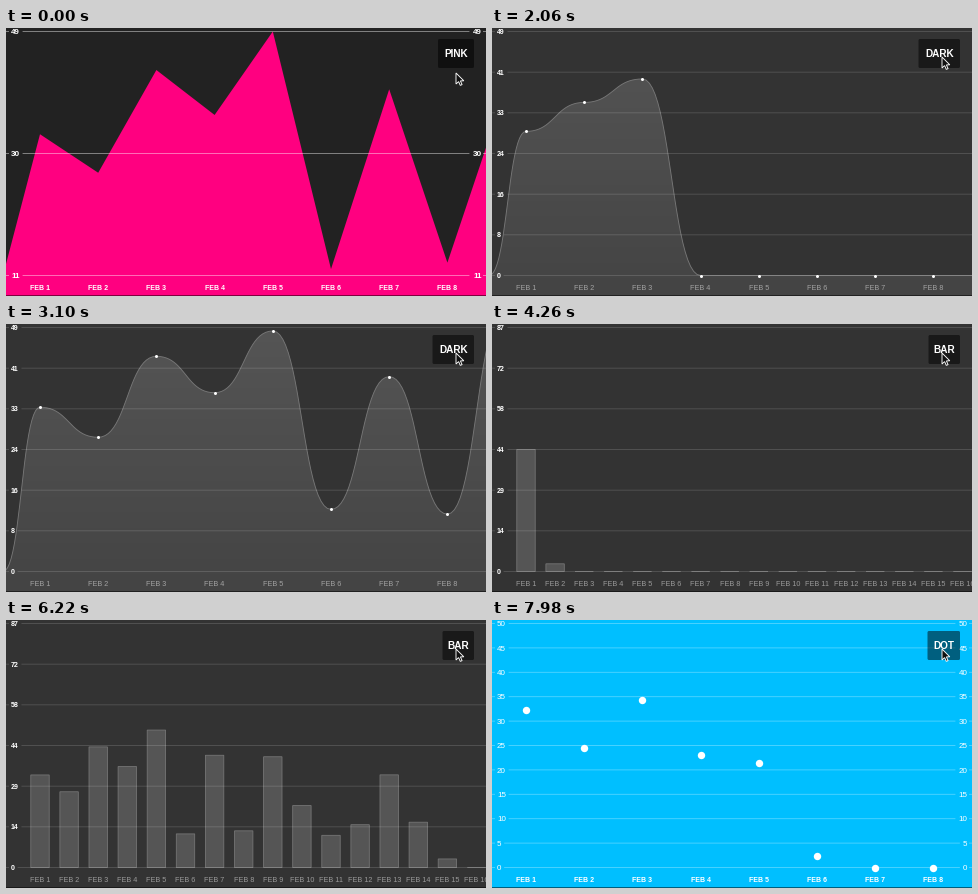
A matplotlib script that plays this animation: 480 by 268 pixels, repeating every 8000 ms.

```python
import math

import matplotlib.pyplot as plt
import numpy as np
from matplotlib.animation import FuncAnimation
from matplotlib.patches import FancyBboxPatch, Polygon, Rectangle

W, H, DPI = 480, 268, 64
LOOP, STEP = 8000, 20
TOP, BASE = 3.5, 247.5
FIRST_X, WIDE, NARROW = 34, 58.2, 29.1
STAGGER = 150
DATA = [33, 27, 43, 36, 49, 12, 40, 13, 40, 22, 11, 17, 32, 12, 17, 87]

# when each graph appears, and when its points begin to rise
SHOWN = {"pink": 0, "dark": 1640, "bar": 4080, "dot": 7120}
RISE = {"dark": 1657, "bar": 4093, "dot": 7130}

plt.rcParams["font.family"] = "Liberation Sans"
plt.rcParams["path.snap"] = False

fig = plt.figure(figsize=(W / DPI, H / DPI), dpi=DPI)


def px(size):
    return size * 72 / DPI


def elastic_out(t):
    if t <= 0:
        return 0.0
    if t >= 1:
        return 1.0
    return 1 + 2 ** (-10 * t) * math.sin((t - 0.075) * 2 * math.pi / 0.3)


def quad_out(t):
    t = min(max(t, 0), 1)
    return 1 - (1 - t) ** 2


def smooth(t):
    t = min(max(t, 0), 1)
    return t * t * (3 - 2 * t)


def y_of(value, low, high):
    return BASE - (value - low) / (high - low) * (BASE - TOP)


def rising(now, start, duration, ease):
    """Current value of every point, each starting a little after the last."""
    return [v * ease((now - start - STAGGER * i) / duration)
            for i, v in enumerate(DATA)]


def layer(color=None):
    ax = fig.add_axes([0, 0, 1, 1])
    ax.set_xlim(0, W)
    ax.set_ylim(H, 0)
    ax.axis("off")
    if color:
        ax.add_patch(Rectangle((0, 0), W, H, fc=color, lw=0, zorder=0))
    return ax


def text(ax, x, cy, label, size, ha="left", **style):
    ax.text(x, cy + 0.344 * size, label, fontsize=px(size), ha=ha,
            va="baseline", zorder=6, **style)


def rules(ax, low, high, parts, size, alpha, both=False, weight="bold"):
    """Horizontal reference lines, broken around their numbers."""
    for i in range(parts + 1):
        value = low + (high - low) * i / parts
        y = y_of(value, low, high)
        label = str(round(value))
        gap = 5 + len(label) * 0.556 * size + 2.7
        spans = [(0, 3), (gap, W - gap if both else W)]
        text(ax, 5, y, label, size, color="white", weight=weight)
        if both:
            spans.append((W - 3, W))
            text(ax, W - 4.5, y, label, size, "right", color="white",
                 weight=weight)
        for span in spans:
            ax.plot(span, (y, y), color="white", alpha=alpha, lw=px(0.85),
                    solid_capstyle="butt", zorder=5)


def dates(ax, gap, count, size=7.2, **style):
    for i in range(count):
        text(ax, FIRST_X + gap * i, 259.5, f"FEB {i + 1}", size, "center",
             **style)


def button(ax, label, left):
    ax.add_patch(FancyBboxPatch((left + 1, 12), 466 - left, 27,
                                boxstyle="round,pad=1,rounding_size=1.5",
                                fc="black", alpha=0.5, lw=0, zorder=7))
    ax.text((left + 468) / 2, 29, label, fontsize=px(10), weight="bold",
            color="white", ha="center", va="baseline", zorder=8)


def curve(xs, ys, n=24):
    """S-shaped Bezier pieces with level tangents at every point."""
    t = np.linspace(0, 1, n)
    u = 1.5 * t - 1.5 * t**2 + t**3
    v = 3 * t**2 - 2 * t**3
    cx = np.concatenate([a + (b - a) * u for a, b in zip(xs, xs[1:])])
    cy = np.concatenate([a + (b - a) * v for a, b in zip(ys, ys[1:])])
    return cx, cy


wide_x = [FIRST_X + WIDE * i for i in range(10)]

# pink area
pink = layer("#222222")
pink_y = [y_of(v, 11, 49) for v in DATA[:10]]
outline = list(zip([-3] + wide_x, [BASE] + pink_y))
pink.add_patch(Polygon([(-3, H)] + outline + [(wide_x[-1], H)],
                       fc="#ff0080", lw=0, zorder=1))
rules(pink, 11, 49, 2, 8, 0.5, both=True)
dates(pink, WIDE, 8, 7, color="white", weight="bold")
button(pink, "PINK", 432)

# dark curve: the gradient lies below, the sky polygon covers what is above
dark = layer()
shade = np.linspace(0x55, 0x44, 64)[:, None, None] / 255
dark.imshow(np.repeat(shade, 3, axis=2), extent=(0, W, H, 0), aspect="auto",
            interpolation="bilinear", zorder=0)
sky = dark.add_patch(Polygon([(0, 0), (W, 0), (W, BASE)], fc="#333333", lw=0,
                             zorder=1))
dark_line, = dark.plot([], [], color="#777777", lw=px(0.9), zorder=2)
dark_dots, = dark.plot([], [], "o", color="white", ms=px(3), mew=0, zorder=6)
rules(dark, 0, 49, 6, 7, 0.17)
dates(dark, WIDE, 8, color="white", alpha=0.5)
button(dark, "DARK", 426.5)

# bars
bar = layer("#333333")
bars = [bar.add_patch(Rectangle((FIRST_X + NARROW * i - 9.2, BASE), 18.4, 0,
                                fc="#555555", ec="#777777", lw=px(0.8),
                                joinstyle="miter", zorder=2))
        for i in range(len(DATA))]
rules(bar, 0, 87, 6, 7, 0.17)
dates(bar, NARROW, 16, color="white", alpha=0.5)
button(bar, "BAR", 436.5)

# dots
dot = layer("#00bfff")
big_dots, = dot.plot([], [], "o", color="white", ms=px(7.4), mew=0, zorder=3)
rules(dot, 0, 50, 10, 8, 0.33, both=True, weight="normal")
dates(dot, WIDE, 8, 7, color="white", weight="bold")
button(dot, "DOT", 435.5)

# pointer and the thin shadow along the bottom
front = layer()
front.add_patch(Rectangle((0, H - 1), W, 1, fc="black", alpha=0.5, lw=0))
ARROW = np.array([(0, 0), (0, 11), (2.6, 8.6), (4.3, 12.4), (6.1, 11.6),
                  (4.4, 7.9), (7.8, 7.8)])
pointer = front.add_patch(Polygon(ARROW, fc="#111111", ec="white",
                                  lw=px(0.9), zorder=9))

SCENES = {"pink": pink, "dark": dark, "bar": bar, "dot": dot}


def draw_dark(now):
    values = rising(now, RISE["dark"], 1500, elastic_out)
    ys = [y_of(v, 0, 49) for v in values[:10]]
    cx, cy = curve([-3] + wide_x, [BASE] + ys)
    sky.set_xy(np.column_stack([np.r_[-3, cx, wide_x[-1]],
                                np.r_[-200, cy, -200]]))
    dark_line.set_data(cx, cy)
    dark_dots.set_data(wide_x, ys)


def draw_bar(now):
    for box, v in zip(bars, rising(now, RISE["bar"], 1500, elastic_out)):
        box.set_height(y_of(v, 0, 87) - BASE)


def draw_dot(now):
    values = rising(now, RISE["dot"], 1000, quad_out)
    big_dots.set_data(wide_x, [y_of(v, 0, 50) for v in values[:10]])


DRAW = {"dark": draw_dark, "bar": draw_bar, "dot": draw_dot}


def update(frame):
    now = frame * STEP
    current = [name for name, start in SHOWN.items() if now >= start][-1]
    for name, ax in SCENES.items():
        ax.set_visible(name == current)
    if current in DRAW:
        DRAW[current](now)
    tip = 45 - 16 * smooth((now - 160) / 600)
    pointer.set_xy(ARROW + (450, tip))
    return []


anim = FuncAnimation(fig, update, frames=LOOP // STEP, interval=STEP,
                     init_func=lambda: update(0), repeat=True,
                     repeat_delay=0, blit=False)
plt.show()
```
